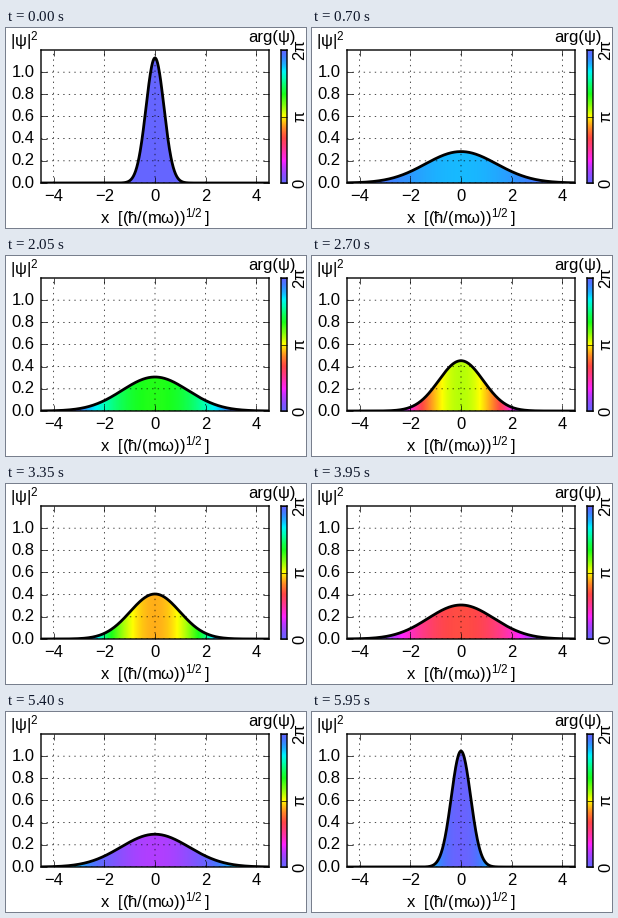
Animation of 300x200 px, one loop 6 s. Source, as a matplotlib script:

```python
from colorsys import hls_to_rgb

import matplotlib.pyplot as plt
import numpy as np
from matplotlib.animation import FuncAnimation
from matplotlib.path import Path

W, H, DPI = 300, 200, 100
FRAMES, INTERVAL = 120, 50
XMAX, YMAX = 4.5, 1.2
SQUEEZE = 4.0  # inverse squared width at t = 0, in units of the ground state

plt.style.use("classic")
plt.rcParams.update({
    "figure.facecolor": "white",
    "savefig.facecolor": "white",
    "path.snap": False,
    "font.family": "Liberation Sans",
    "font.size": 12,
    "mathtext.fontset": "custom",
    "mathtext.rm": "Liberation Sans",
    "mathtext.default": "regular",
})


def phase_colors(phase):
    """Cyclic hue with lightness balanced between the primary hues."""
    hue = (np.asarray(phase) / (2 * np.pi) + 2 / 3) % 1
    light = np.interp(hue * 6, range(7), [0.64, 0.5, 0.55, 0.48, 0.70, 0.57, 0.64])
    return np.array([hls_to_rgb(h, l, 1) for h, l in zip(hue, light)])


def spread(t):
    return np.cos(t) ** 2 + (SQUEEZE * np.sin(t)) ** 2


def density(x, t):
    a = SQUEEZE / spread(t)
    return np.sqrt(a / np.pi) * np.exp(-a * x**2)


def phase(x, t):
    chirp = (SQUEEZE**2 - 1) * np.sin(t) * np.cos(t) / spread(t)
    return chirp * x**2 / 2 - t / 2


def add_axes(x, y, w, h):
    return fig.add_axes([x / W, y / H, w / W, h / H])


def label(x, y, text, **kw):
    fig.text(x / W, y / H, text, va="baseline", **kw)


fig = plt.figure(figsize=(W / DPI, H / DPI), dpi=DPI)

ax = add_axes(35, 45, 228, 133)
edges = np.linspace(-XMAX, XMAX, 229)
mids = (edges[:-1] + edges[1:]) / 2
xs = np.linspace(-XMAX, XMAX, 601)
fill = ax.imshow(np.ones((1, mids.size, 3)), extent=(-XMAX, XMAX, 0, YMAX),
                 aspect="auto", interpolation="nearest", origin="lower")
curve, = ax.plot(xs, density(xs, 0), color="black", lw=2)
ax.set_xlim(-XMAX, XMAX)
ax.set_ylim(0, YMAX)
ax.set_xticks(range(-4, 5, 2))
ax.set_yticks(np.arange(6) * 0.2)
ax.tick_params(axis="y", pad=4.7)
ax.grid(True)

bar = add_axes(275, 45, 6, 133)
bar.imshow(phase_colors(np.linspace(0, 2 * np.pi, 256, endpoint=False))[:, None],
           extent=(0, 1, 0, 2 * np.pi), aspect="auto", origin="lower",
           interpolation="nearest")
bar.set_xticks([])
bar.set_yticks([0, np.pi, 2 * np.pi], ["0", "π", "2π"], rotation=90, va="center")
bar.yaxis.tick_right()

label(4.5, 182, "|ψ|$^{2}$")
label(242.4, 186, "arg(ψ)")
label(149, 5, r"x  [(ħ/(mω))$^{1/2}\,$]", ha="center")


def update(i):
    t = 4 * np.pi * i / FRAMES
    y = density(xs, t)
    curve.set_ydata(y)
    fill.set_data(phase_colors(phase(mids, t))[None])
    outline = np.column_stack([np.r_[-XMAX, xs, XMAX], np.r_[0, y, 0]])
    fill.set_clip_path(Path(outline), ax.transData)
    return fill, curve


anim = FuncAnimation(fig, update, frames=FRAMES, interval=INTERVAL, repeat=True)
plt.show()
```
